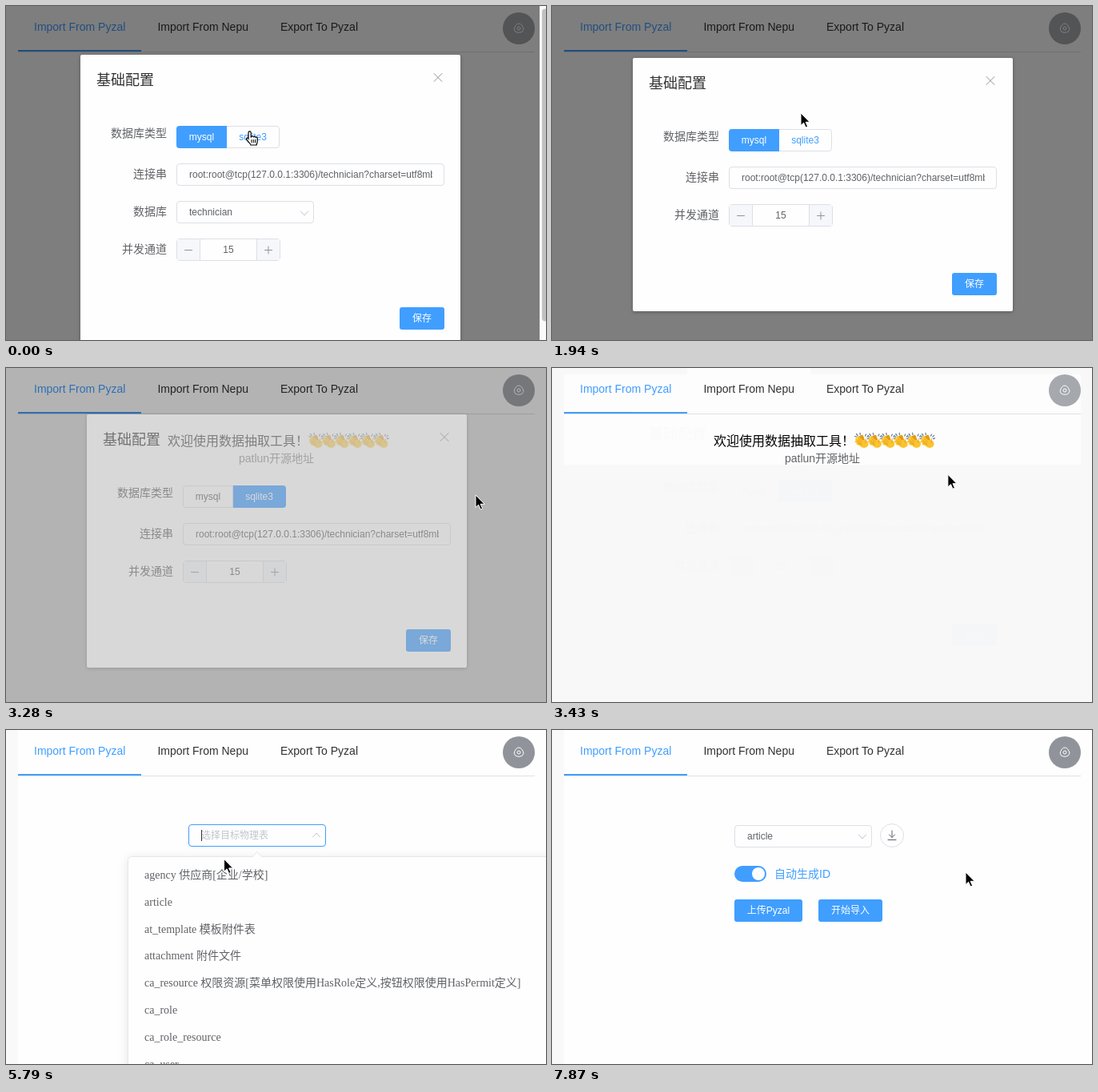
Write an HTML page that moves like this. It is 675 px wide and 418 px high and loops after 8 s.

```html
<!DOCTYPE html>
<html lang="zh-CN">
<head>
<meta charset="utf-8">
<title>数据抽取工具</title>
<style>
  html, body { margin: 0; width: 100%; height: 100%; overflow: hidden; background: #f9f9f9; }
  #stage { display: block; width: 675px; height: 418px; font-family: "Liberation Sans", "Noto Sans CJK SC", "Noto Sans CJK", sans-serif; }
  #stage text { white-space: pre; }
  .serif { font-family: "Liberation Serif", "Noto Sans CJK SC", "Noto Sans CJK", serif; }
  .line { fill: none; stroke-linecap: round; stroke-linejoin: round; }
</style>
</head>
<body>
<svg id="stage" viewBox="0 0 675 418"></svg>
<script>
const LOOP = 8000, STEP = 148.6;
const BLUE = '#409eff', INK = '#303133', GREY = '#606266', PALE = '#c0c4cc', EDGE = '#dcdfe6', WHITE = '#fefefe';
const stage = document.getElementById('stage');

// Text is placed by its vertical centre.
const text = (x, y, str, size = 12, fill = GREY, attrs = '') =>
  `<text x="${x}" y="${y + size * 0.36}" font-size="${size}" fill="${fill}" ${attrs}>${str}</text>`;
const rect = (x, y, w, h, fill, attrs = '') =>
  `<rect x="${x}" y="${y}" width="${w}" height="${h}" fill="${fill}" ${attrs}/>`;
const line = (d, stroke, attrs = '') => `<path class="line" d="${d}" stroke="${stroke}" ${attrs}/>`;
const group = (id, body, attrs = '') => `<g id="${id}" ${attrs}>${body}</g>`;
const box = (x, y, w, h, attrs = '') =>
  rect(x + .5, y + .5, w - 1, h - 1, WHITE, `rx="3.5" stroke="${EDGE}" ${attrs}`);
const button = (x, y, w, label) =>
  rect(x, y, w, 28, BLUE, 'rx="3"') + text(x + w / 2, y + 14, label, 12, '#fff', 'text-anchor="middle"');
const label = (y, str) => text(108, y, str, 14, GREY, 'text-anchor="end"');

const clap = x => `<g transform="translate(${x} 81)">
  ${line('M3 1.500l1.500 2M7.500 .500l.300 2M1 4.500l2 .700M15 2l-1 2M18 3.500l-1.600 1.600M19 7l-2 .500', '#6d8794', 'stroke-width="1.300"')}
  ${line('M13 13L10 4.500M14 13L7.500 5.500', '#e59a12', 'stroke-width="3.500"')}
  ${line('M12 13L5 5.500M11 14L3 8M11 15L2.500 11M11 16L4.500 14', '#fcc42c', 'stroke-width="2.800"')}
  <ellipse cx="12.500" cy="14" rx="5.500" ry="5" fill="#fcc42c"/>
  ${line('M10 11.500L5.500 7.200M9 13.500L4 9.700M9.500 15.200L4.800 12.500M14.500 12.500L15 7.500', '#dd9314', 'stroke-width=".700"')}
</g>`;

const gear = () => {
  const pts = Array.from({ length: 12 }, (_, i) => {
    const a = (i + .5) * Math.PI / 6, r = i % 4 < 2 ? 6 : 5.4;
    return `${(641 + r * Math.cos(a)).toFixed(1)} ${(28 + r * Math.sin(a)).toFixed(1)}`;
  });
  return `<circle id="gearDisc" cx="641" cy="28" r="20"/>` +
    line(`M${pts.join('L')}Z`, '#fff') + '<circle cx="641" cy="28" r="2" fill="none" stroke="#fff"/>';
};

const page = rect(0, 0, 675, 418, '#f9f9f9', 'id="paper"') +
  group('panel', rect(15, 8, 646, 113, WHITE) + rect(169, 0, 154, 57, WHITE)) +
  rect(15, 0, 660, 418, WHITE, 'id="sheet"') +
  rect(15, 0, 154, 56, '#ecf5ff', 'id="tabHover"') +
  rect(15, 57, 646, 1, '#e2e2e2') + rect(15, 55, 154, 2, BLUE) +
  text(35, 26, 'Import From Pyzal', 14, BLUE) +
  text(189.4, 26, 'Import From Nepu', 14, INK) +
  text(343, 26, 'Export To Pyzal', 14, INK) + gear();

const welcome = group('welcome',
  text(202, 91, '欢迎使用数据抽取工具！', 16, '#000') +
  Array.from({ length: 6 }, (_, i) => clap(377.5 + i * 16.4)).join('') +
  text(338, 113, 'patlun开源地址', 14, GREY, 'text-anchor="middle"'));

const form = group('form',
  box(228, 119, 172, 28, 'id="tableBox"') +
  text(244, 133, '选择目标物理表', 12, PALE, 'id="tableText"') +
  rect(244, 126, 1, 14, INK, 'id="caret"') +
  line('M383.500 131l4.500 5 4.500-5', PALE, 'id="tableArrow"') +
  group('download', `<circle cx="425" cy="132" r="14.500" fill="${WHITE}" stroke="${EDGE}"/>` +
    line('M425 126v8M421.500 131l3.500 3.500 3.500-3.500M420 137.500h10', GREY)) +
  rect(228, 170, 40, 20, EDGE, 'rx="10" id="track"') +
  '<circle id="knob" cy="180" r="8" fill="#fff"/>' +
  text(278, 180, '自动生成ID', 14, INK, 'id="autoId" font-weight="500"') +
  button(228, 212, 85, '上传Pyzal') + button(333, 212, 80, '开始导入'));

const tables = ['agency 供应商[企业/学校]', 'article', 'at_template 模板附件表', 'attachment 附件文件',
  'ca_resource 权限资源[菜单权限使用HasRole定义,按钮权限使用HasPermit定义]', 'ca_role', 'ca_role_resource', 'ca_user'];
const ROW = 33.8, LIST_TOP = 164;
const dropdown = group('dropdown',
  rect(152.5, 158.5, 540, 280, WHITE, 'rx="4" stroke="#e4e7ed" style="filter:drop-shadow(0 2px 6px rgba(0,0,0,.1))"') +
  `<path d="M308 159l6-6.500 6 6.500" fill="${WHITE}" stroke="#e4e7ed"/>` +
  rect(153, 0, 522, ROW, '#f5f7fa', 'id="rowHover"') +
  tables.map((name, i) => text(173, 181 + i * ROW, name, 14, GREY, 'class="serif"')).join(''));

const dialog = group('dialog',
  rect(0, 0, 475, 364, WHITE, 'id="card" rx="2" style="filter:drop-shadow(0 1px 2px rgba(0,0,0,.3))"') +
  text(20, 31.5, '基础配置', 18, INK) +
  line('M442 23.500l10 10M452 23.500l-10 10', '#909399') +
  label(98, '数据库类型') +
  box(120, 89, 129, 28) +
  `<path id="mysqlFill" d="M183 89h-59a4 4 0 0 0-4 4v20a4 4 0 0 0 4 4h59z" fill="${BLUE}"/>` +
  `<path id="sqliteFill" d="M182 89h63a4 4 0 0 1 4 4v20a4 4 0 0 1-4 4h-63z" fill="${BLUE}"/>` +
  rect(182, 89, 1, 28, EDGE, 'id="divider"') +
  text(151.5, 103, 'mysql', 12, '#fff', 'id="mysql" text-anchor="middle"') +
  text(215.5, 103, 'sqlite3', 12, GREY, 'id="sqlite" text-anchor="middle"') +
  label(149, '连接串') + box(120, 136, 335, 28) +
  `<svg x="136" y="137" width="304" height="26">${text(0, 13, 'root:root@tcp(127.0.0.1:3306)/technician?charset=utf8mb4')}</svg>` +
  group('database', label(196, '数据库') + box(120, 183, 172, 28, 'id="dbBox"') + text(136, 197, 'technician') +
    line('M275.500 196l4.500 5 4.500-5', PALE)) +
  group('lower', label(243, '并发通道') + box(120, 230, 130, 28) +
    rect(121, 231, 28, 26, '#f5f7fa') + rect(221, 231, 28, 26, '#f5f7fa') +
    rect(149, 231, 1, 26, EDGE) + rect(220, 231, 1, 26, EDGE) +
    line('M130.500 244.500h9M230.500 244.500h9M235 240v9', '#909399') +
    text(185, 244, '15', 12, GREY, 'text-anchor="middle"') +
    button(399, 316, 56, '保存')));

const scrollbar = group('scrollbar', rect(667, 0, 8, 418, '#fafafa') + rect(670, 0, 10, 391, '#c1c1c1', 'rx="4" id="thumb"'));

const pointer = group('cursor',
  group('arrow', '<path d="M0 0v15.500l3.600-3.300 2.500 5.700 2.500-1.100-2.500-5.500h5z" fill="#000" stroke="#fff"/>') +
  group('hand', '<path d="M-2 1.500a1.600 1.600 0 0 1 3.200 0V7l1-.6a1.500 1.500 0 0 1 2.400.4 1.500 1.500 0 0 1 2.400.5 1.500 1.500 0 0 1 2.200 1.300V12c0 3-1 3-1 5H1C.8 15-4 11.500-4.500 9.500c-.3-1.600 1.500-2 2.500-.5z" fill="#fff" stroke="#000" stroke-width="1.200"/>' +
    line('M2 10.500v3.500M4.300 10.500v3.500M6.600 10.500v3.500', '#000')));

stage.innerHTML = page + welcome + form + dropdown +
  rect(0, 0, 675, 418, '#000', 'id="shade"') + dialog + scrollbar + pointer;

const el = Object.fromEntries([...stage.querySelectorAll('[id]')].map(node => [node.id, node]));
const set = (id, attrs) => { for (const key in attrs) el[id].setAttribute(key, attrs[key]); };
const show = (id, on) => { el[id].style.display = on ? '' : 'none'; };
const within = (t, from, to) => t >= from && t < to;
const progress = (t, start, length) => Math.min(1, Math.max(0, (t - start) / length));

function track(keys, t) {
  const next = keys.findIndex(key => key[0] > t);
  if (next < 0) return keys.at(-1).slice(1);
  const a = keys[next - 1], b = keys[next], p = (t - a[0]) / (b[0] - a[0]);
  return a.slice(1).map((v, i) => v + (b[i + 1] - v) * p);
}

const path = [[0, 305, 157], [450, 302, 172], [1040, 268, 266], [1190, 268, 274], [1486, 311, 134], [1932, 311, 134],
  [2230, 314, 160], [2400, 314, 160], [3120, 587, 159], [3300, 587, 159], [3860, 149, 37], [4600, 149, 37],
  [4900, 56, 85], [5050, 56, 85], [5490, 275, 135], [5790, 273, 161], [6230, 235, 210], [6540, 235, 210],
  [6830, 236, 171], [7430, 236, 171], [7870, 517, 178]];
const scroll = [[0, 4], [150, 6], [890, 27], [1040, 27]];
const handTimes = [[0, 440], [1480, 1780], [2080, 2520], [3560, 4740], [5340, 5700], [6080, 6600], [6680, 7560]];

function render(now) {
  const t = Math.floor((now % LOOP + 10) / STEP) * STEP;
  const [x, y] = track(path, t);
  const tall = t < 1780, sqlite = t >= 2220;
  const offset = tall ? track(scroll, t)[0] : 0;

  const fade = progress(t, 3120, 300);
  set('dialog', { transform: `translate(${tall ? 93 : 101} ${65 - offset - 14 * fade})`, opacity: 1 - fade });
  show('dialog', fade < 1);
  set('shade', { opacity: .5 * (1 - fade ** 1.3) });
  set('card', { height: tall ? 364 : 317 });
  show('database', tall);
  set('lower', { transform: `translate(0 ${tall ? 0 : -47})` });
  set('dbBox', { stroke: within(t, 740, 1180) ? PALE : EDGE });
  show('mysqlFill', !sqlite);
  show('sqliteFill', sqlite);
  show('divider', sqlite);
  set('mysql', { fill: sqlite ? GREY : '#fff' });
  set('sqlite', { fill: sqlite ? '#fff' : t < 440 || t > 1480 ? BLUE : GREY });
  show('scrollbar', tall);
  set('thumb', { y: offset * 433 / 479 });

  const opened = t >= 4740, chosen = t >= 6530, on = t >= 7120;
  set('paper', { fill: t < 3400 ? WHITE : '#f9f9f9' });
  show('panel', !opened);
  show('sheet', opened);
  show('tabHover', within(t, 3700, 4740));
  set('gearDisc', { fill: opened ? '#909399' : '#a6a9ad' });
  show('welcome', !opened);
  show('form', opened);
  set('form', { transform: `translate(0 ${chosen ? 0 : -1})` });

  const open = progress(t, 5340, 300) - progress(t, 6500, 300);
  show('dropdown', open > 0);
  set('dropdown', { opacity: open, transform: `translate(0 158) scale(1 ${open}) translate(0 -158)` });
  const row = Math.floor((y - LIST_TOP) / ROW);
  show('rowHover', row >= 0);
  set('rowHover', { y: LIST_TOP + Math.max(0, row) * ROW });

  set('tableBox', { stroke: within(t, 5480, 7110) ? BLUE : EDGE });
  set('tableText', { fill: chosen ? GREY : PALE });
  el.tableText.textContent = chosen ? 'article' : '选择目标物理表';
  show('caret', within(t, 5480, 6520) && (t - 5480) % 1000 < 500);
  set('tableArrow', { transform: within(t, 5480, 6520) ? 'rotate(180 388 133)' : '' });
  show('download', chosen);
  set('track', { fill: on ? BLUE : EDGE });
  set('knob', { cx: 238 + 20 * progress(t, 7050, 200) });
  set('autoId', { fill: on ? BLUE : INK });

  const hand = handTimes.some(([from, to]) => within(t, from, to));
  show('hand', hand);
  show('arrow', !hand);
  set('cursor', { transform: `translate(${x} ${y})` });
}

const start = performance.now();
function tick() {
  render(performance.now() - start);
  requestAnimationFrame(tick);
}
tick();
</script>
</body>
</html>
```
